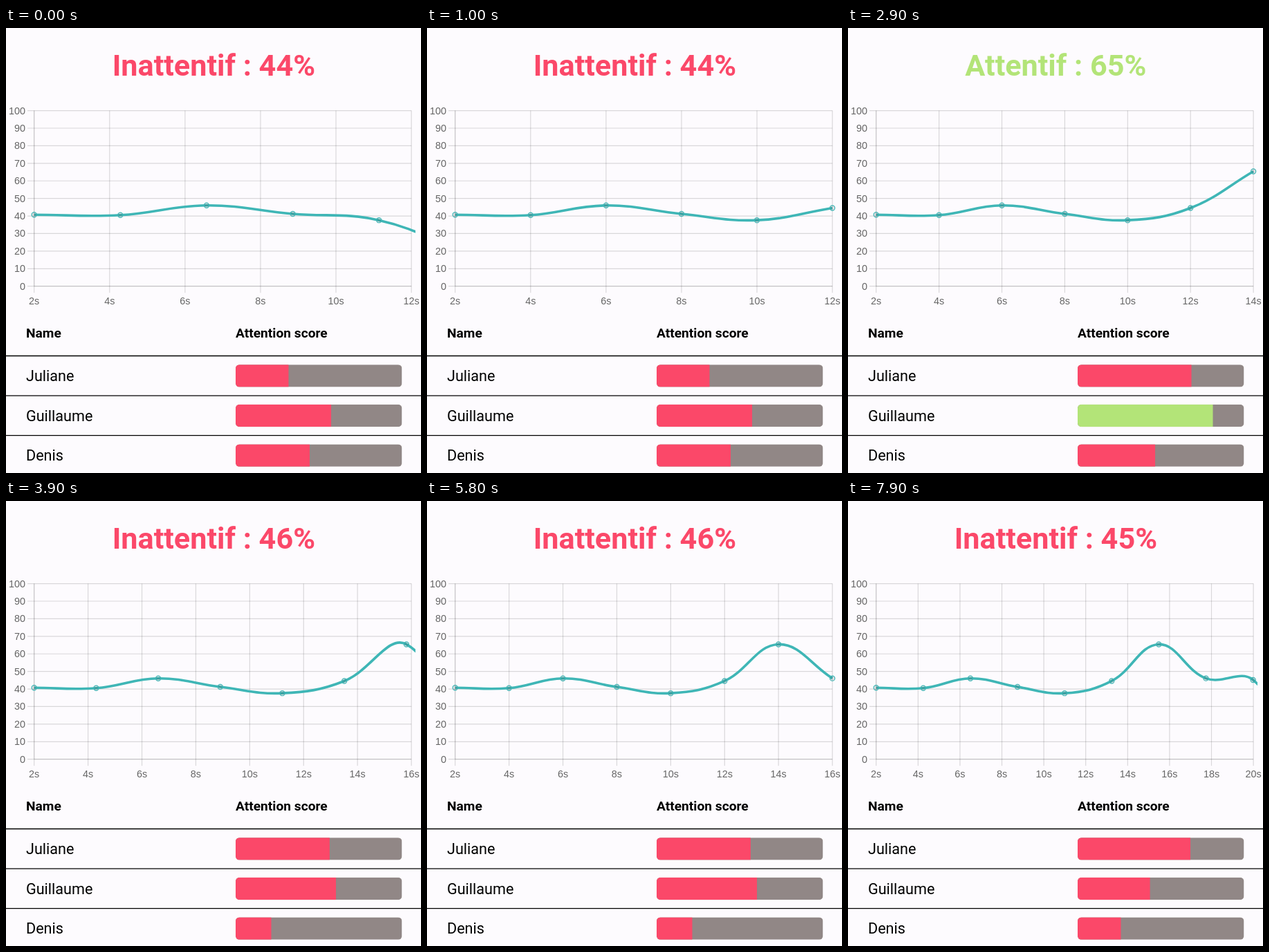
Write an HTML page that moves like this. It is 600 by 644 pixels and loops after 8000 ms.

```html
<!DOCTYPE html>
<html lang="fr">
<head>
<meta charset="utf-8">
<title>Attention</title>
<style>
  html, body { margin: 0; width: 100%; height: 100%; overflow: hidden; background: #fdfbfe; }
  svg { display: block; width: 100%; height: 100%; }
  text { font-family: Roboto, sans-serif; }
  .title { font-size: 43.2px; font-weight: 700; text-anchor: middle; }
  .head { font-size: 19.2px; font-weight: 700; }
  .name { font-size: 21.6px; }
  .tick { font-family: "Liberation Sans", Arial, sans-serif; font-size: 14.4px; fill: #666; }
  .grid { stroke: #000; stroke-opacity: .14; stroke-width: 1.2; }
  .axis { stroke: #000; stroke-opacity: .1; stroke-width: 1.2; }
  .rule { stroke: #000; stroke-width: 1.3; }
  .curve { fill: none; stroke: #3fb6b6; stroke-width: 3.6; }
  .dot { fill: #000; fill-opacity: .1; stroke: #3fb6b6; stroke-width: 1.2; }
</style>
</head>
<body>
<svg id="stage" viewBox="0 0 600 644"></svg>
<script>
const LOOP = 8000, TICK = 100, EASE_TIME = 1000;
const LEFT = 40.7, RIGHT = 586.1, TOP = 119.6, BASE = 373.7;
const TENSION = 0.4, DOT = 3.6;
const RED = '#fb4869', GREEN = '#b3e478', GREY = '#918786';
const BAR = { x: 332, width: 240.5, height: 32.4 };
const ROW = { top: 474.5, height: 57.6 };
const people = ['Juliane', 'Guillaume', 'Denis'];

const history = [40.7, 40.5, 46, 41.2, 37.6];
const updates = [
  { at: -131, scores: [31.8, 57.4, 44.5] },
  { at: 1880, scores: [68.4, 81.3, 46.6] },
  { at: 3876, scores: [56.5, 60.3, 21.4] },
  { at: 5880, scores: [49.9, 34.7, 50.9] },
  { at: 7898, scores: [67.8, 43.5, 26] }
];
const mean = list => list.reduce((a, b) => a + b, 0) / list.length;
const series = history.concat(updates.map(u => mean(u.scores)));

const stage = document.getElementById('stage');
function add(parent, tag, attrs = {}, text) {
  const el = document.createElementNS('http://www.w3.org/2000/svg', tag);
  for (const key in attrs) el.setAttribute(key, attrs[key]);
  if (text !== undefined) el.textContent = text;
  parent.appendChild(el);
  return el;
}
const line = (parent, cls, x1, y1, x2, y2) => add(parent, 'line', { class: cls, x1, y1, x2, y2 });
const mix = (a, b, p) => a + (b - a) * p;
const easeOutQuart = t => 1 - Math.pow(1 - t, 4);
const toY = v => mix(BASE, TOP, v / 100);
const stepFor = count => (RIGHT - LEFT) / (count - 1);

// Fixed parts
const defs = add(stage, 'defs');
add(add(defs, 'clipPath', { id: 'area' }), 'rect', { x: 34.7, y: 113, width: 557.3, height: 267 });
const title = add(stage, 'text', { class: 'title', x: 300.4, y: 69 });
for (let v = 0; v <= 100; v += 10) {
  const y = toY(v);
  line(stage, 'grid', 31.1, y, RIGHT, y);
  add(stage, 'text', { class: 'tick', x: 28, y: y + 5, 'text-anchor': 'end' }, v);
}
line(stage, 'axis', LEFT, TOP, LEFT, BASE);
line(stage, 'axis', LEFT, BASE, RIGHT, BASE);
const columns = add(stage, 'g');
const curve = add(stage, 'path', { class: 'curve', 'clip-path': 'url(#area)' });
const dots = series.map(() => add(stage, 'circle', { class: 'dot', r: DOT }));

add(stage, 'text', { class: 'head', x: 29, y: 447.8 }, 'Name');
add(stage, 'text', { class: 'head', x: 332, y: 447.8 }, 'Attention score');
const fills = people.map((name, i) => {
  const y = ROW.top + i * ROW.height, barY = y + 12.7;
  line(stage, 'rule', 0, y, 600, y);
  add(stage, 'text', { class: 'name', x: 29, y: y + 36.5 }, name);
  const box = { x: BAR.x, y: barY, width: BAR.width, height: BAR.height };
  add(add(defs, 'clipPath', { id: 'bar' + i }), 'rect', { ...box, rx: 5.5 });
  const bar = add(stage, 'g', { 'clip-path': `url(#bar${i})` });
  add(bar, 'rect', { ...box, fill: GREY });
  return add(bar, 'rect', box);
});

// Control points on both sides of each point of the spline
function controls(points, i) {
  const cur = points[i], prev = points[i - 1] || cur, next = points[i + 1] || cur;
  const before = Math.hypot(cur.x - prev.x, cur.y - prev.y);
  const after = Math.hypot(next.x - cur.x, next.y - cur.y);
  const scale = TENSION / (before + after);
  const dx = next.x - prev.x, dy = next.y - prev.y;
  return {
    inX: cur.x - dx * scale * before, inY: cur.y - dy * scale * before,
    outX: cur.x + dx * scale * after, outY: cur.y + dy * scale * after
  };
}

function spline(points) {
  const c = points.map((_, i) => controls(points, i));
  return points.map((p, i) => i === 0 ? `M${p.x} ${p.y}` :
    `C${c[i - 1].outX} ${c[i - 1].outY} ${c[i].inX} ${c[i].inY} ${p.x} ${p.y}`).join('');
}

function showUpdate(index) {
  const { scores } = updates[index];
  const score = Math.floor(mean(scores));
  const good = score >= 50;
  title.textContent = `${good ? 'Attentif' : 'Inattentif'} : ${score}%`;
  title.setAttribute('fill', good ? GREEN : RED);
  scores.forEach((s, i) => {
    fills[i].setAttribute('width', BAR.width * s / 100);
    fills[i].setAttribute('fill', s >= 70 ? GREEN : RED);
  });
  columns.replaceChildren();
  const count = history.length + index + 1;
  for (let i = 0; i < count; i++) {
    const x = LEFT + i * stepFor(count);
    line(columns, 'grid', x, TOP, x, 383.3);
    add(columns, 'text', { class: 'tick', x, y: 400, 'text-anchor': 'middle' }, `${2 * (i + 1)}s`);
  }
}

function showCurve(index, time) {
  const count = history.length + index + 1;
  const p = easeOutQuart(Math.min(1, (time - updates[index].at) / EASE_TIME));
  const step = mix(stepFor(count - 1), stepFor(count), p);
  const points = series.slice(0, count).map((v, i) => ({
    x: LEFT + i * step,
    y: toY(i === count - 1 ? v * p : v)
  }));
  curve.setAttribute('d', spline(points));
  dots.forEach((dot, i) => {
    const point = points[i];
    const visible = point && point.x <= RIGHT + 5;
    dot.setAttribute('visibility', visible ? 'visible' : 'hidden');
    if (!visible) return;
    dot.setAttribute('cx', point.x);
    dot.setAttribute('cy', point.y);
  });
}

let shownTime = -1, shownUpdate = -1;
function draw(elapsed) {
  const time = Math.floor((elapsed % LOOP) / TICK) * TICK;
  if (time === shownTime) return;
  shownTime = time;
  const index = updates.filter(u => u.at <= time).length - 1;
  if (index !== shownUpdate) showUpdate(shownUpdate = index);
  showCurve(index, time);
}

const start = performance.now();
function loop() {
  draw(performance.now() - start);
  requestAnimationFrame(loop);
}
loop();
</script>
</body>
</html>
```
